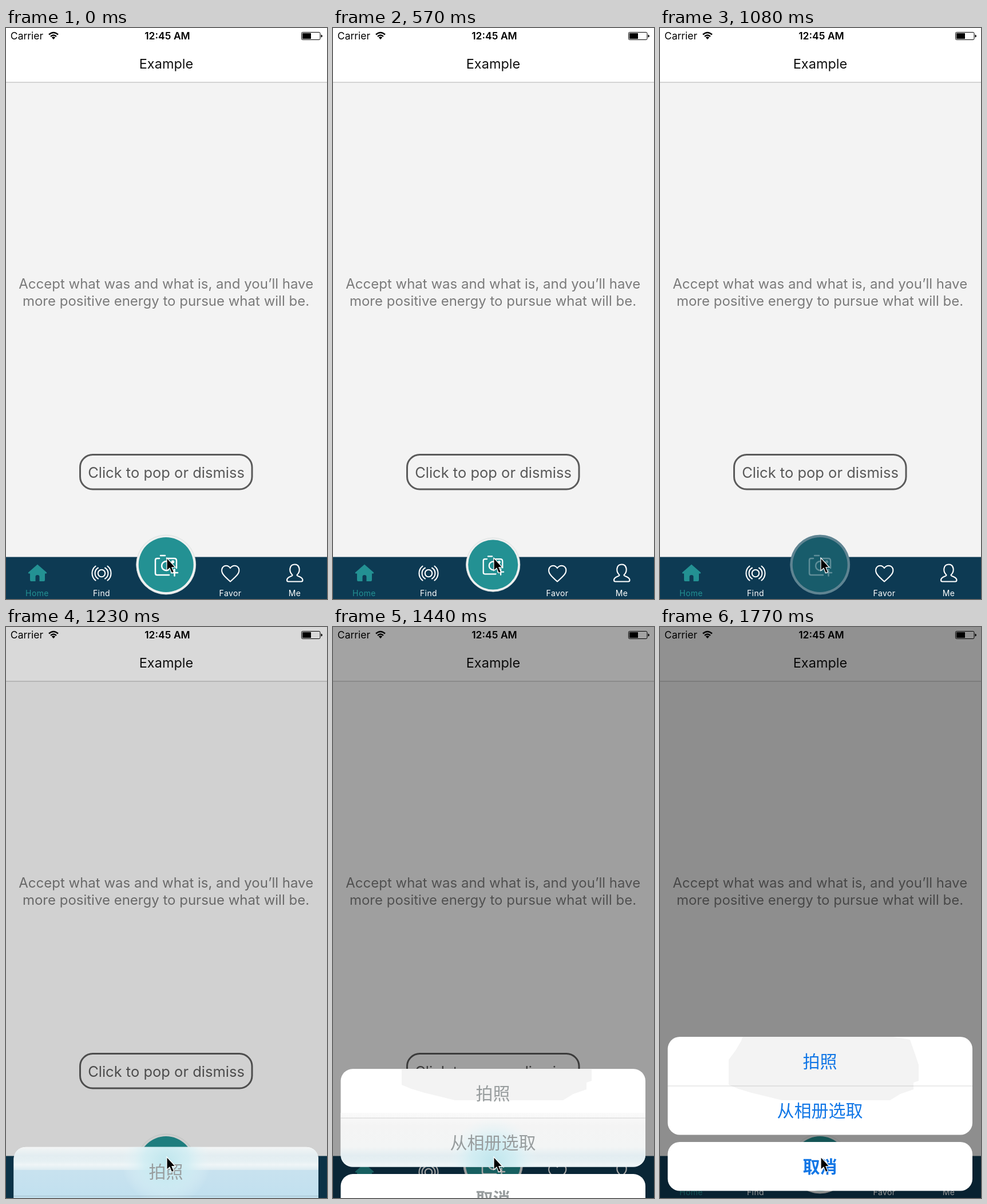
Write an HTML page that moves like this. It is 561 px wide and 999 px high and loops after 2.77 s.

```html
<!DOCTYPE html>
<html lang="en">
<head>
<meta charset="utf-8">
<title>Action sheet</title>
<style>
  html, body { margin: 0; width: 100%; height: 100%; overflow: hidden; background: #f3f3f3; }
  svg { display: block; width: 100%; height: 100%; }
  text { font-family: Inter, "Open Sans", sans-serif; text-anchor: middle; }
  .line { fill: none; stroke: #fff; stroke-width: 2.1; stroke-linecap: round; stroke-linejoin: round; }
  .label { font-size: 14px; letter-spacing: .4px; fill: #fff; }
  #options text { font: 30px "Noto Sans CJK SC", "Noto Sans CJK", sans-serif; }
  #options .cancel { font-weight: 700; }
</style>
</head>
<body>
<svg viewBox="0 0 561 999" preserveAspectRatio="none">
  <defs>
    <clipPath id="optionsShape"><rect x="13.5" width="532.5" height="171.5" rx="21"/></clipPath>
    <linearGradient id="barGlow" gradientUnits="userSpaceOnUse" x1="0" y1="850" x2="0" y2="999">
      <stop offset="0" stop-color="#fafafa"/>
      <stop offset=".15" stop-color="#f4f4f4"/>
      <stop offset=".4" stop-color="#f3f5f5"/>
      <stop offset=".5" stop-color="#e3edf1"/>
      <stop offset=".57" stop-color="#e6f0f3"/>
      <stop offset=".61" stop-color="#eff5f7"/>
      <stop offset=".67" stop-color="#dcebf1"/>
      <stop offset=".67" stop-color="#c8e2ef"/>
      <stop offset="1" stop-color="#c1e0ef"/>
    </linearGradient>
    <radialGradient id="plusGlow" gradientUnits="userSpaceOnUse" cx="280" cy="935" r="78">
      <stop offset="0" stop-color="#bfe6ed"/>
      <stop offset=".5" stop-color="#cdedf3" stop-opacity=".75"/>
      <stop offset="1" stop-color="#e8f6f9" stop-opacity="0"/>
    </radialGradient>
  </defs>

  <rect width="561" height="999" fill="#f3f3f3"/>
  <rect width="561" height="94.5" fill="#fff"/>
  <rect id="navTint" width="561" height="94.5" fill="#f3f3f3"/>
  <rect y="94.5" width="561" height="1" fill="#b2b2b2"/>
  <text x="280" y="70.5" font-size="23.5" fill="#111">Example</text>

  <g font-size="24" fill="#7a7a7a">
    <text x="279.7" y="456">Accept what was and what is, and you’ll have</text>
    <text x="279.5" y="486">more positive energy to pursue what will be.</text>
  </g>
  <rect x="129.5" y="746.5" width="300.5" height="60.5" rx="22" fill="none" stroke="#5a5a5a" stroke-width="3"/>
  <text x="280" y="786.5" font-size="25.5" fill="#585858">Click to pop or dismiss</text>

  <!-- tab bar -->
  <rect y="925.5" width="561" height="73.5" fill="#0d3a53"/>
  <path d="M55 938.5L71 952.5Q72 954.5 69 954.5H68V966Q68 968 66 968H58.5V960Q58.5 957 55 957T51.5 960V968H44Q42 968 42 966V954.5H41Q38 954.5 39 952.5Z" fill="#239193"/>
  <g class="line">
    <circle cx="167" cy="954" r="6.2"/>
    <path d="M161 963.5A11 11 0 0 1 161 944.5M173 944.5A11 11 0 0 1 173 963.5M156.5 966.5A16 16 0 0 1 156.5 941.5M177.5 941.5A16 16 0 0 1 177.5 966.5"/>
    <path d="M392 945C388 939 380 939.5 377.5 946C375.5 953 380 958 392 968.5C404 958 409 953 407 946C404.5 939.5 396 939 392 945Z"/>
    <path d="M500.5 957C494 951 495 938.5 504.5 938.5S515 951 508.5 957C508 960 518.5 959 518.5 966Q518.5 968.5 516 968.5H493.5Q491 968.5 491 966C491 959 501 960 500.5 957Z"/>
  </g>
  <g class="label">
    <text x="54.5" y="994" fill="#239193">Home</text>
    <text x="167" y="994">Find</text>
    <text x="392" y="994">Favor</text>
    <text x="504.5" y="994">Me</text>
  </g>

  <g id="plus">
    <circle id="ring" cx="279.7" cy="939" r="52" stroke-width=".8"/>
    <circle id="disc" cx="279.7" cy="939" r="48"/>
    <g class="line" id="camera" style="stroke-width:2.5">
      <path d="M270 923H278M268 928H264Q261 928 261 931V954Q261 957 264 957H285M281 928H294Q298 928 298 932V945"/>
      <path d="M284 934A8 8 0 1 0 284 948M294.5 947V958.5M289 953H300"/>
      <circle cx="291.5" cy="934" r="1.5"/>
    </g>
  </g>

  <rect id="shade" width="561" height="999"/>

  <!-- status bar -->
  <g fill="#000">
    <text x="36.5" y="20" font-size="17.5">Carrier</text>
    <text x="282" y="20" font-size="17.5" font-weight="600">12:45 AM</text>
    <path d="M83 20L79.8 16.6Q83 14 86.2 16.6Z"/>
    <path d="M75 11.5Q83 4.5 91 11.5M78 14.8Q83 10.3 88 14.8" fill="none" stroke="#000" stroke-width="2.4"/>
    <rect x="516.5" y="7.5" width="32.5" height="13" rx="2" fill="none" stroke="#000"/>
    <rect x="518" y="9" width="15" height="10"/>
    <path d="M550.5 11.5Q553 12 553 14T550.5 16.5Z"/>
  </g>

  <g id="sheet">
    <g clip-path="url(#optionsShape)">
      <rect width="561" height="172" fill="#fff"/>
      <g id="backdrop">
        <path d="M145 715L142 724L132 741L120 757V801L137 808L160 815L185 821L213 828H402L420 817L443 809V797L452 794V766L446 748L437 722L395 715Z" fill="#f3f3f3"/>
        <rect id="barLight" y="850" width="561" height="149" fill="url(#barGlow)"/>
        <circle id="plusLight" cx="280" cy="935" r="78" fill="url(#plusGlow)"/>
      </g>
      <rect y="85.5" width="561" height="1" fill="#000" fill-opacity=".16"/>
    </g>
    <rect x="13.5" y="184" width="532.5" height="85.5" rx="21" fill="#fff"/>
    <g id="options" lang="zh-CN">
      <text x="279.5" y="54">拍照</text>
      <text x="279.5" y="140">从相册选取</text>
      <text class="cancel" x="279.5" y="237.5">取消</text>
    </g>
  </g>

  <path d="M281 927V949.5L286 945L289.5 953.5L293.5 952L290 943.5H296Z" fill="#000" stroke="#fff" stroke-width="1.2"/>
</svg>

<script>
const LOOP = 2770, STEP = 30;
const PRESS = 1050, RELEASE = 1200, TINT = 1470;
// [time, share of the way up]
const RISE = [[1140, 0], [1290, .528], [1440, .801], [1470, .894], [1530, .96], [1590, .988], [1650, 1]];

const $ = id => document.getElementById(id);
const clamp = v => Math.min(1, Math.max(0, v));
const set = (id, attributes) => {
  for (const name in attributes) $(id).setAttribute(name, attributes[name]);
};

function follow(keys, t) {
  const next = keys.findIndex(key => key[0] > t);
  if (next === 0) return keys[0][1];
  if (next < 0) return keys[keys.length - 1][1];
  const [t0, v0] = keys[next - 1], [t1, v1] = keys[next];
  return v0 + (v1 - v0) * (t - t0) / (t1 - t0);
}

function draw(t) {
  const breath = Math.sin(Math.PI * clamp((t - 60) / 1020)) ** 2;
  const scale = 1 - .093 * breath;
  set('plus', { transform: `translate(279.7 939) scale(${scale}) translate(-279.7 -939)` });

  const pressed = t >= PRESS && t < RELEASE;
  set('ring', { fill: pressed ? '#5f8492' : '#eef0f0', stroke: pressed ? '#5f8492' : '#d9dddb' });
  set('disc', { fill: pressed ? '#185c6b' : '#239193' });
  set('camera', { opacity: pressed ? .3 : 1 });

  const rise = follow(RISE, t);
  const top = 717 + 282 * (1 - rise);
  set('shade', { opacity: .415 * (1 - (1 - rise) ** 1.1) });
  set('navTint', { opacity: .6 * rise });
  set('sheet', { transform: `translate(0 ${top})` });
  set('backdrop', { transform: `translate(0 ${-top})` });
  set('barLight', { opacity: t < TINT ? 1 : 0 });
  set('plusLight', { opacity: clamp((1590 - t) / 150) });
  set('options', { fill: t < TINT ? '#989d9e' : '#1277e6' });
}

const start = performance.now();
function tick() {
  const t = (performance.now() - start) % LOOP;
  draw(Math.floor(t / STEP) * STEP);
  requestAnimationFrame(tick);
}
tick();
</script>
</body>
</html>
```
